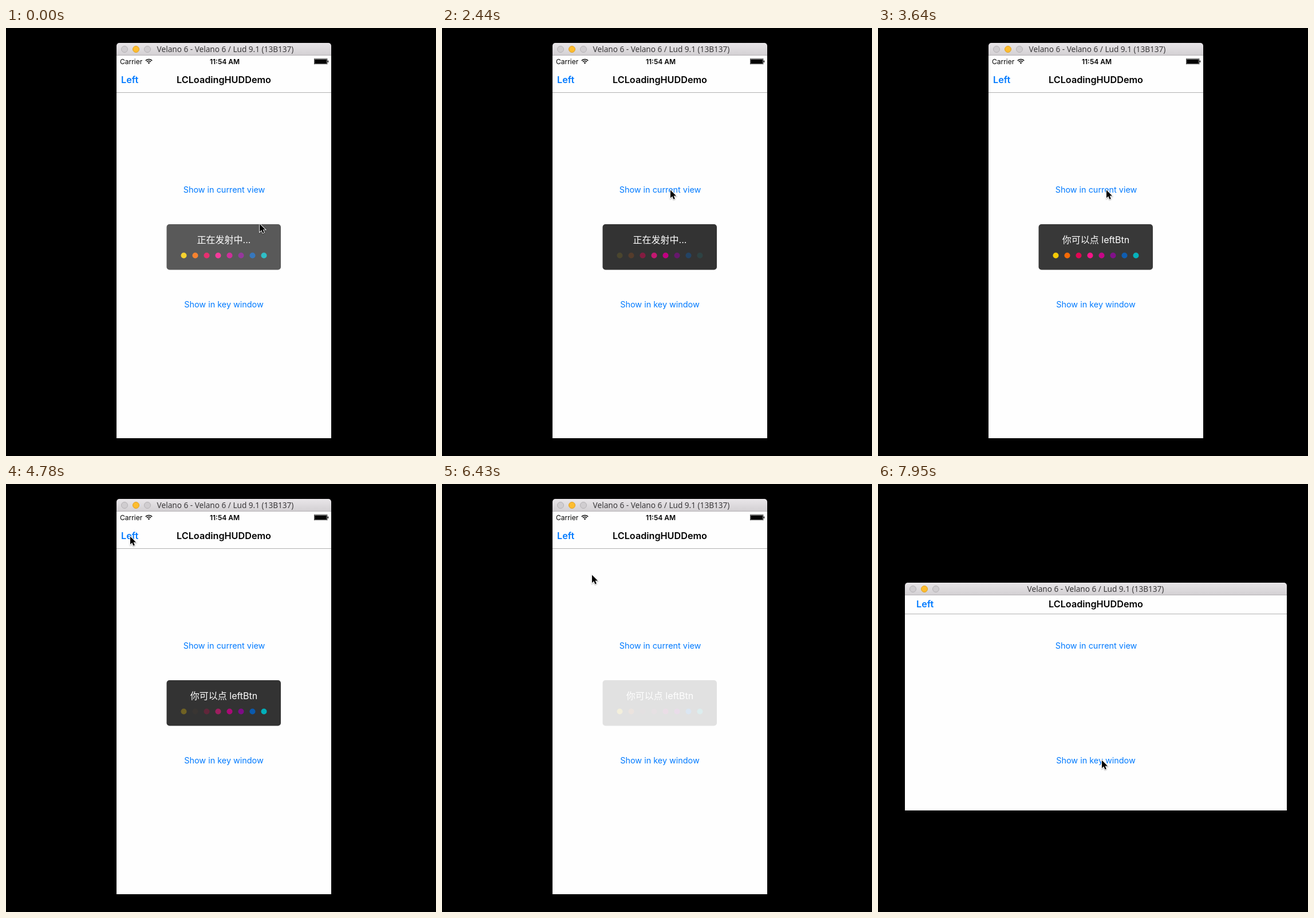
Recreate the animation shown at these times as an HTML page with a canvas. Size 751 by 746 pixels, loop 8 s.

```html
<!DOCTYPE html>
<html lang="en">
<head>
<meta charset="utf-8">
<title>Loading HUD demo</title>
<style>
  html, body { margin: 0; width: 100%; height: 100%; overflow: hidden; background: #000; }
  canvas { display: block; width: 751px; height: 746px; }
</style>
</head>
<body>
<canvas id="stage"></canvas>
<script>
const LOOP = 8000, WIDTH = 751, HEIGHT = 746;
const CX = 380.5, CY = 381.5;
const TURN = 7010, SPIN_START = 7070, SPIN_TIME = 400;
const SANS = 'Inter, "Noto Sans CJK SC", sans-serif';
const TITLE_FONT = '13.6px "Noto Sans", "Open Sans", sans-serif';
const BLUE = '#007aff';
const DOTS = ['#f5c800', '#f56600', '#e2004f', '#f50f85', '#c40084', '#7d0b86', '#0a59ad', '#00b0ba'];
const DOT_TIME = 700, DOT_DELAY = 200, FADE = 250;

const huds = [
  { text: '正在发射中...', show: -180, pulse: 260, hide: 2764 },
  { text: '你可以点 leftBtn', show: 3415, pulse: 3862, hide: 6240 }
];

// Pointer stops: time, x, y
const path = [
  [0, 442, 340], [90, 440, 337], [800, 399, 283], [960, 398, 281],
  [3720, 398, 281], [4040, 216, 90], [5340, 216, 90], [5720, 261, 157],
  [7250, 261, 157], [7780, 389, 449], [7950, 390, 480]
];
const viewPresses = [3090];
const leftPresses = [3990, 4450, 5050];

const canvas = document.getElementById('stage');
const screenCtx = canvas.getContext('2d');
const layer = document.createElement('canvas');
const layerCtx = layer.getContext('2d');
const ratio = window.devicePixelRatio || 1;
for (const c of [canvas, layer]) {
  c.width = WIDTH * ratio;
  c.height = HEIGHT * ratio;
  c.getContext('2d').scale(ratio, ratio);
}

const clamp = v => Math.min(1, Math.max(0, v));
const smooth = v => { v = clamp(v); return v * v * (3 - 2 * v); };
const mix = (a, b, k) => a + (b - a) * k;

function label(c, text, x, y, font, color, align = 'center') {
  c.font = font;
  c.fillStyle = color;
  c.textAlign = align;
  c.fillText(text, x, y);
}

function disc(c, x, y, r, fill, line) {
  c.beginPath();
  c.arc(x, y, r, 0, Math.PI * 2);
  c.fillStyle = fill;
  c.fill();
  if (line) {
    c.strokeStyle = line;
    c.lineWidth = 1;
    c.stroke();
  }
}

function roundBox(c, x, y, w, h, radii) {
  c.beginPath();
  c.roundRect(x, y, w, h, radii);
  c.fill();
}

function pressAlpha(t, presses) {
  for (const p of presses) {
    if (t >= p && t < p + 220) return mix(0.2, 1, smooth((t - p - 70) / 150));
  }
  return 1;
}

function drawTitleBar(c, x, y, w, titleX) {
  const g = c.createLinearGradient(0, y, 0, y + 22);
  g.addColorStop(0, '#e9e6e9');
  g.addColorStop(1, '#d2cfd2');
  c.fillStyle = g;
  roundBox(c, x, y, w, 22, [5, 5, 0, 0]);
  c.fillStyle = '#b4b1b4';
  c.fillRect(x, y + 21, w, 1);
  for (let i = 0; i < 3; i++) {
    const on = i === 1;
    disc(c, x + 14 + i * 20, y + 11, 5.5, on ? '#fdbd2f' : '#d0cdd0', on ? '#e0a023' : '#b5b2b5');
  }
  label(c, 'Velano 6 - Velano 6 / Lud 9.1 (13B137)', titleX, y + 16, TITLE_FONT, '#3a383a');
}

function drawStatus(c, left, top, w) {
  label(c, 'Carrier', left + 6, top + 14.5, '12px ' + SANS, '#000', 'left');
  label(c, '11:54 AM', left + w / 2 + 1.5, top + 14.5, '600 12px ' + SANS, '#000');

  const wx = left + 56.5, wy = top + 14.5;
  c.strokeStyle = '#000';
  c.lineWidth = 1.7;
  for (const r of [5, 8]) {
    c.beginPath();
    c.arc(wx, wy, r, -Math.PI * 0.75, -Math.PI * 0.25);
    c.stroke();
  }
  c.fillStyle = '#000';
  c.beginPath();
  c.moveTo(wx, wy);
  c.arc(wx, wy, 2.7, -Math.PI * 0.75, -Math.PI * 0.25);
  c.fill();

  const bx = left + w - 30;
  c.lineWidth = 0.7;
  c.strokeRect(bx + 0.4, top + 5.8, 22.6, 9);
  c.fillRect(bx + 1.2, top + 6.6, 21, 7.4);
  c.fillRect(bx + 23.6, top + 8.6, 1.5, 3.4);
}

// k runs from 0 (upright layout) to 1 (wide layout); the origin is the screen centre.
function drawScreen(c, t, k) {
  const w = mix(375, 667, k), h = mix(667, 375, k);
  const left = -w / 2, top = -h / 2;
  const base = top + mix(48, 21, k);
  c.fillStyle = '#fefefe';
  c.fillRect(left, top, w, h);
  c.fillStyle = '#b2b2b2';
  c.fillRect(left, top + mix(64, 32, k), w, 1);

  c.globalAlpha = 1 - k;
  if (k < 1) drawStatus(c, left, top, w);
  c.globalAlpha = 1;
  label(c, 'LCLoadingHUDDemo', 0, base, '600 16.2px ' + SANS, '#000');
  c.globalAlpha = pressAlpha(t, leftPresses);
  label(c, 'Left', left + mix(8, 20, k), base, '600 16.2px ' + SANS, BLUE, 'left');
  c.globalAlpha = pressAlpha(t, viewPresses);
  label(c, 'Show in current view', 0.5, -94.5, '14.4px ' + SANS, BLUE);
  c.globalAlpha = 1;
  label(c, 'Show in key window', 0, 105.5, '14.4px ' + SANS, BLUE);
}

function dotAlpha(time) {
  if (time <= 0) return 1;
  return Math.abs(1 - (time / DOT_TIME) % 2);
}

function drawHud(t, hud) {
  const alpha = smooth((t - hud.show) / FADE) * (1 - smooth((t - hud.hide) / FADE));
  if (alpha <= 0) return;
  const c = layerCtx;
  c.clearRect(0, 0, WIDTH, HEIGHT);
  c.fillStyle = 'rgba(0,0,0,0.8)';
  roundBox(c, 280.5, 342, 199.5, 79.5, 5);
  label(c, hud.text, CX, 375, '16px ' + SANS, '#fff');
  DOTS.forEach((color, i) => {
    c.globalAlpha = dotAlpha(t - hud.pulse - i * DOT_DELAY);
    disc(c, 310.5 + i * 20, 396.5, 5, color);
  });
  c.globalAlpha = 1;
  screenCtx.globalAlpha = alpha;
  screenCtx.drawImage(layer, 0, 0, WIDTH, HEIGHT);
  screenCtx.globalAlpha = 1;
}

function pointerAt(t) {
  let i = 0;
  while (i < path.length - 2 && t >= path[i + 1][0]) i++;
  const [t0, x0, y0] = path[i], [t1, x1, y1] = path[i + 1];
  const k = smooth((t - t0) / (t1 - t0));
  return [mix(x0, x1, k), mix(y0, y1, k)];
}

const arrow = new Path2D('M1 1.5V15.3L4.2 12.3L6.5 17.4L8.8 16.4L6.6 11.4H11Z');

function drawPointer(c, t) {
  const [x, y] = pointerAt(t);
  c.save();
  c.translate(x, y);
  c.lineJoin = 'miter';
  c.strokeStyle = '#fff';
  c.lineWidth = 1.8;
  c.shadowColor = 'rgba(0,0,0,0.35)';
  c.shadowBlur = 2 * ratio;
  c.shadowOffsetY = ratio;
  c.stroke(arrow);
  c.shadowColor = 'transparent';
  c.fillStyle = '#000';
  c.fill(arrow);
  c.restore();
}

function draw(t) {
  const c = screenCtx;
  const wide = t >= TURN;
  const k = wide ? smooth((t - SPIN_START) / SPIN_TIME) : 0;
  c.fillStyle = '#000';
  c.fillRect(0, 0, WIDTH, HEIGHT);

  if (wide) drawTitleBar(c, 47, 172, 667, 380);
  else drawTitleBar(c, 193, 26, 375, 383);

  c.save();
  c.beginPath();
  if (wide) c.rect(47, 194, 667, 375);
  else c.rect(193, 48, 375, 667);
  c.clip();
  c.translate(CX, CY);
  if (wide) c.rotate(-Math.PI / 2 * (1 - k));
  drawScreen(c, t, k);
  c.restore();

  for (const hud of huds) drawHud(t, hud);
  drawPointer(c, t);
}

function tick() {
  draw(performance.now() % LOOP);
  requestAnimationFrame(tick);
}
tick();
</script>
</body>
</html>
```
